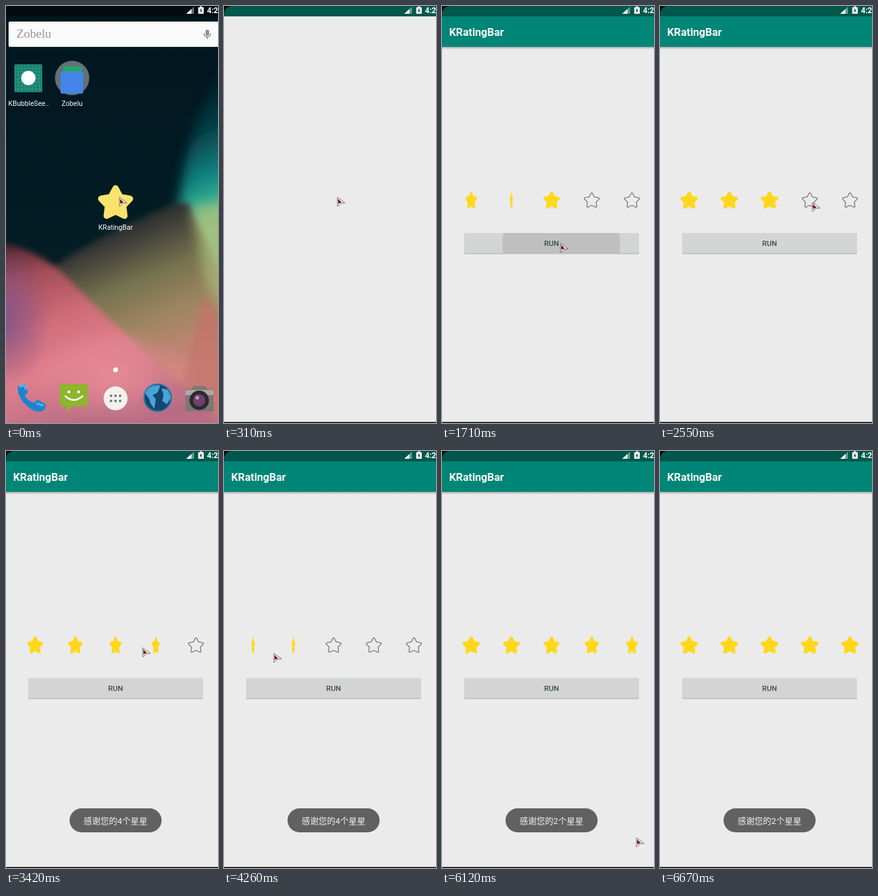
These frames come from a looping animation (327 px wide and 643 px high, 6820 ms). An HTML page:

```html
<!DOCTYPE html>
<html lang="en">
<head>
<meta charset="utf-8">
<title>KRatingBar</title>
<style>
  html, body { margin: 0; width: 100%; height: 100%; overflow: hidden; background: #000; }
  svg { display: block; width: 100%; height: 100%; }
  text { font-family: Roboto, "Noto Sans CJK SC", "Noto Sans CJK", sans-serif; }
  .label { font-size: 10.7px; fill: #fff; text-anchor: middle; }
</style>
</head>
<body>
<svg viewBox="0 0 327 643">
  <defs>
    <linearGradient id="sky" x2="0" y2="1">
      <stop offset="0" stop-color="#01161f"/><stop offset=".55" stop-color="#021c24"/><stop offset="1" stop-color="#2c2430"/>
    </linearGradient>
    <linearGradient id="teal" gradientUnits="userSpaceOnUse" x1="262" y1="150" x2="345" y2="330">
      <stop offset="0" stop-color="#02222b"/><stop offset=".3" stop-color="#064049"/>
      <stop offset=".6" stop-color="#0f7f80"/><stop offset=".85" stop-color="#3cb894"/><stop offset="1" stop-color="#86c98c"/>
    </linearGradient>
    <linearGradient id="olive" gradientUnits="userSpaceOnUse" x1="168" y1="330" x2="265" y2="560">
      <stop offset="0" stop-color="#1a2426"/><stop offset=".16" stop-color="#41403a"/><stop offset=".4" stop-color="#76724f"/>
      <stop offset=".65" stop-color="#9d8560"/><stop offset="1" stop-color="#cc8578"/>
    </linearGradient>
    <linearGradient id="pink" gradientUnits="userSpaceOnUse" x1="20" y1="360" x2="120" y2="640">
      <stop offset="0" stop-color="#4a2430"/><stop offset=".2" stop-color="#a44d58"/>
      <stop offset=".45" stop-color="#cf6c76"/><stop offset=".7" stop-color="#df7f8e"/><stop offset="1" stop-color="#b96d84"/>
    </linearGradient>
    <radialGradient id="mauve"><stop offset="0" stop-color="#84558a"/><stop offset="1" stop-color="#84558a" stop-opacity="0"/></radialGradient>
    <radialGradient id="rose"><stop offset="0" stop-color="#e68a94"/><stop offset="1" stop-color="#e68a94" stop-opacity="0"/></radialGradient>
    <linearGradient id="shade" x2="0" y2="1"><stop stop-color="#000" stop-opacity=".28"/><stop offset="1" stop-color="#000" stop-opacity="0"/></linearGradient>
    <filter id="soft" x="-20%" y="-20%" width="140%" height="140%"><feGaussianBlur stdDeviation="9"/></filter>
    <filter id="edge"><feGaussianBlur stdDeviation="5"/></filter>
    <pattern id="grid" width="5.4" height="5.4" patternUnits="userSpaceOnUse" x="13" y="90">
      <path d="M0 0H5.4M0 0V5.4" stroke="#5fb3a2" stroke-width=".7"/>
    </pattern>
    <clipPath id="button"><rect x="34" y="350" width="270" height="31" rx="2"/></clipPath>
    <path id="star"/>
    <g id="empty" stroke-linejoin="round">
      <use href="#star" transform="scale(11)" fill="#5c5c5c" stroke="#5c5c5c" stroke-width=".31"/>
      <use href="#star" transform="scale(11)" fill="#ebebeb" stroke="#ebebeb" stroke-width=".12"/>
    </g>
    <use id="full" href="#star" transform="scale(12)" fill="#ffd81d" stroke="#ffd81d" stroke-width=".38" stroke-linejoin="round"/>
  </defs>

  <g id="home">
    <rect width="327" height="643" fill="url(#sky)"/>
    <path d="M345 85Q285 165 270 285L250 420 345 520Z" fill="url(#teal)" filter="url(#soft)"/>
    <path d="M65 408Q150 350 215 325Q262 298 283 305Q308 360 345 440V660H180Z" fill="url(#olive)" filter="url(#edge)"/>
    <path d="M284 310L345 300V480L310 430Z" fill="#aebd78" opacity=".7" filter="url(#soft)"/>
    <path d="M303 450L345 490V660H255Z" fill="#c4706a" opacity=".6" filter="url(#edge)"/>
    <path d="M-25 362Q50 372 100 425Q190 515 290 600L345 660H-25Z" fill="url(#pink)" filter="url(#edge)"/>
    <ellipse cx="-5" cy="480" rx="75" ry="110" fill="url(#mauve)"/>
    <ellipse cx="165" cy="570" rx="130" ry="75" fill="url(#rose)"/>

    <rect x="4" y="24" width="330" height="39" rx="2" fill="#fafafa"/>
    <text x="16" y="49" font-size="19" fill="#979797" style="font-family:'Liberation Serif',serif">Zobelu</text>
    <g fill="none" stroke="#777" stroke-width="1.2">
      <rect x="308.5" y="37" width="4" height="8" rx="2" fill="#999"/>
      <path d="M305.500 42Q305.500 47.500 310.500 47.500T315.500 42M310.500 47V51"/>
    </g>

    <rect x="13" y="90" width="43" height="43" rx="2" fill="#15836f"/>
    <rect x="13" y="90" width="43" height="43" rx="2" fill="url(#grid)"/>
    <circle cx="34.500" cy="111" r="11" fill="#fff"/>
    <text class="label" x="35" y="154">KBubbleSee..</text>

    <circle cx="102" cy="111" r="26.500" fill="#637078"/>
    <rect x="88" y="93" width="29" height="29" rx="2" fill="#23a566"/>
    <rect x="84" y="101" width="35" height="34" rx="2" fill="#4484e8"/>
    <text class="label" x="102" y="154">Zobelu</text>

    <use href="#star" transform="translate(169 304.500) scale(23.500)" fill="#fae26c" stroke="#fae26c" stroke-width=".4" stroke-linejoin="round"/>
    <text class="label" x="169" y="345">KRatingBar</text>
    <circle cx="169" cy="561" r="3.700" fill="#fff"/>

    <path d="M18 586L29 583 34 595 29 601Q34 609 43 612L49 607 62 615 59 623Q48 630 34 618Q17 604 18 586Z" fill="#1d83cf"/>
    <path d="M20 587L28 585 31 592M47 613L58 616" fill="none" stroke="#56b1ee" stroke-width="3"/>
    <path d="M85 583H124Q126 583 126 585V615Q126 617 124 617H103L93 626V617H85Q83 617 83 615V585Q83 583 85 583Z" fill="#8cb62c"/>
    <path d="M91 601Q104 614 119 601" fill="none" stroke="#fff" stroke-width="2.500"/>
    <circle cx="97" cy="595" r="2.300" fill="#fff"/><circle cx="112" cy="595" r="2.300" fill="#fff"/>
    <circle cx="169" cy="605" r="18.500" fill="#f4f1f1"/>
    <path d="M162 601H177M162 609H177" stroke="#777" stroke-width="4" stroke-linecap="round" stroke-dasharray="0 7"/>
    <circle cx="234" cy="604" r="22" fill="#16456f"/>
    <path d="M214 596Q222 583 238 585L234 596 226 600 231 606 229 621Q222 614 221 606ZM240 589L250 592 255 604 248 614 241 609 243 600Z" fill="#4aa3d8"/>
    <circle cx="234" cy="604" r="21" fill="none" stroke="#2f7fb5" stroke-width="2"/>
    <path d="M277 591H286L289 586H307L310 591H320V625H277Z" fill="#7b7779"/>
    <path d="M277 592H320V600H277Z" fill="#aba7a8"/>
    <circle cx="298" cy="608" r="15" fill="#2c292d"/><circle cx="298" cy="608" r="9.500" fill="#70406d"/>
    <circle cx="295" cy="604" r="3" fill="#bd8fb5"/>
    <rect width="327" height="16" fill="#020c11"/>
  </g>

  <g id="app">
    <path d="M0 642V0H327V642Z" fill="#ebebeb"/>
    <rect width="327" height="16" fill="#00574b"/>
    <path d="M0 0H12A12 12 0 0 0 0 12Z"/>
    <rect y="641.500" width="327" height="1.500"/>
    <g id="content">
      <rect y="16" width="327" height="47" fill="#008577"/>
      <rect y="63" width="327" height="4" fill="url(#shade)"/>
      <text x="11" y="46" font-size="16.600" font-weight="700" fill="#fff">KRatingBar</text>
      <g id="stars"></g>
      <rect x="34" y="351.500" width="270" height="31" rx="2" fill="#b9bbba"/>
      <rect x="34" y="350" width="270" height="31" rx="2" fill="#d3d5d4"/>
      <circle id="ripple" cx="184" cy="367" fill="#000" clip-path="url(#button)"/>
      <text x="169" y="370" font-size="11.500" font-weight="500" fill="#3b4f40" text-anchor="middle">RUN</text>
    </g>
    <g id="toast">
      <rect x="98" y="551" width="142" height="37" rx="18.500" fill="#616161"/>
      <text id="thanks" x="169" y="575" font-size="13" fill="#f2f2f2" text-anchor="middle"></text>
    </g>
  </g>

  <g fill="#fff">
    <path d="M278 12L290 1V12Z" opacity=".4"/><path d="M278 12L286 4.700V12Z"/>
    <path d="M296.500 2H299V.500H302.500V2H305V12H296.500Z"/>
    <path d="M301.500 3L298.500 7.500H300.500L300 11 303 6.500H301Z" fill="#25433f"/>
    <text x="310" y="11" font-size="12" font-weight="700">4:2</text>
  </g>
  <g id="cursor">
    <path d="M0 0L11.500 8.500 6 9 0 14Z" fill="#fff" stroke="#333" stroke-width=".7"/>
    <path d="M.8 2.500L6.500 7.800 1.200 10Z" fill="#7a1414"/>
  </g>
</svg>
<script>
const LOOP = 6820, FLIP = 1000, LAG = 45;
// Screen refreshes: first time, last time, count
const BURSTS = [[0, 0, 1], [150, 770, 9], [850, 850, 1], [1020, 1250, 4], [1630, 2240, 9], [2320, 2550, 4],
  [2950, 3570, 9], [3650, 4260, 9], [4340, 4650, 5], [4890, 5510, 9], [5590, 6190, 9], [6280, 6670, 6]];
// Ratings: start time, number of stars
const RATINGS = [[0, 0], [1600, 3], [2930, 4], [3944, 2], [5546, 5]];
// Pointer: time, x, y
const PATH = [[0, 175, 295], [950, 175, 295], [1250, 183, 366], [2250, 183, 366], [2550, 235, 303],
  [3330, 235, 303], [3650, 97, 306], [3950, 97, 306], [4250, 77, 312], [4850, 77, 312],
  [5470, 300, 299], [5650, 300, 299], [6190, 300, 613], [6360, 294, 650], [LOOP, 294, 650]];

const $ = id => document.getElementById(id);
const ramp = (t, a, b) => Math.min(1, Math.max(0, (t - a) / (b - a)));
const ease = u => u * u * (3 - 2 * u);

let d = "";
for (let i = 0; i < 10; i++) {
  const a = i * Math.PI / 5, r = i % 2 ? 0.53 : 1;
  d += (i ? "L" : "M") + (r * Math.sin(a)).toFixed(3) + " " + (-r * Math.cos(a)).toFixed(3);
}
$("star").setAttribute("d", d + "Z");

const stars = Array.from({ length: 5 }, () =>
  $("stars").appendChild(document.createElementNS("http://www.w3.org/2000/svg", "use")));

function refreshTime(t) {
  const [a, b, n] = BURSTS.findLast(s => s[0] <= t);
  if (t >= b) return b;
  const step = (b - a) / (n - 1);
  return a + Math.floor((t - a) / step) * step;
}

function drawStars(t) {
  const [start, count] = RATINGS.findLast(r => r[0] <= t);
  const size = 0.93 + 0.07 * ramp(t, 770, 850);
  stars.forEach((star, i) => {
    const age = t - start - i * LAG, filled = i < count && age >= 0;
    const left = 1 - ramp(age, 0, FLIP);
    const turn = filled ? 2 * Math.PI * (1 - left ** 4) : 0;
    star.setAttribute("href", filled ? "#full" : "#empty");
    star.setAttribute("transform", `translate(${45 + 62 * i} 300.2) scale(${size * Math.cos(turn)} ${size})`);
  });
}

function drawCursor(t) {
  const i = PATH.findLastIndex(p => p[0] <= t);
  const [t0, x0, y0] = PATH[i], [t1, x1, y1] = PATH[i + 1];
  const u = ease(ramp(t, t0, t1));
  $("cursor").setAttribute("transform", `translate(${x0 + (x1 - x0) * u} ${y0 + (y1 - y0) * u})`);
}

function draw(t) {
  const open = ramp(t, 90, 300), size = 0.4 + 0.6 * ease(open);
  $("app").setAttribute("opacity", open);
  $("app").setAttribute("transform", `translate(169 303) scale(${size}) translate(-169 -303)`);
  $("content").setAttribute("opacity", ramp(t, 350, 600));

  $("ripple").setAttribute("r", 20 + 200 * ramp(t, 1600, 1900));
  $("ripple").setAttribute("opacity", t < 1600 ? 0 : 0.1 * (1 - ramp(t, 1800, 2240)));

  const second = t > 5120;
  $("thanks").textContent = `感谢您的${second ? 2 : 4}个星星`;
  $("toast").setAttribute("opacity", second ? ramp(t, 5130, 5400) : ramp(t, 2980, 3250) - ramp(t, 4880, 5110));

  drawStars(t);
  drawCursor(t);
}

const begin = performance.now();
function tick() {
  draw(refreshTime((performance.now() - begin) % LOOP));
  requestAnimationFrame(tick);
}
tick();
</script>
</body>
</html>
```
